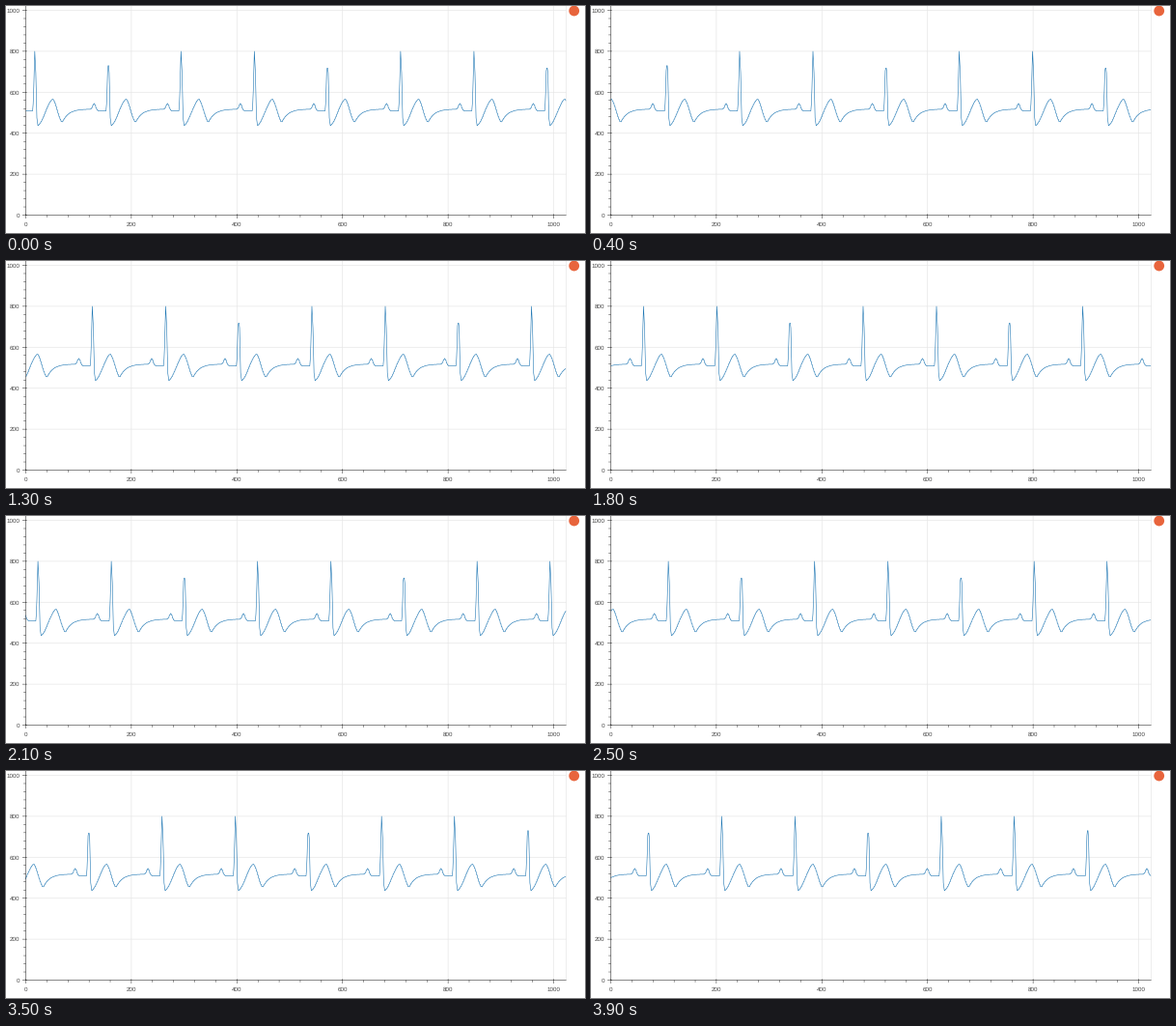
Animation, 600 px wide and 235 px high, one loop 4 s. Source, as a matplotlib script:

```python
import numpy as np
import matplotlib.pyplot as plt
from matplotlib.animation import FuncAnimation
from matplotlib.patches import Circle

plt.rcParams["text.hinting"] = "none"

W, H, DPI = 600, 235, 100
FRAMES, INTERVAL = 40, 100
PT = 72 / DPI  # points per pixel
X0, Y0 = 20.5, 216.5
SX, SY = 0.547, 0.212
SPAN = 1024
PERIOD, FIRST_PEAK = 138.6, 17

# Samples scrolled past at a few moments; the feed rate drifts slightly.
SCROLL_T = [0, 8, 13, 18, 25, 31, 39]
SCROLL_X = [0, 100, 168, 232, 324, 404, 500]


def px(x):
    return X0 + SX * np.asarray(x)


def py(y):
    return Y0 - SY * np.asarray(y)


def ramp(u, u0, u1, y0, y1):
    """Move from y0 to y1, softened at both ends."""
    t = np.clip((u - u0) / (u1 - u0), 0, 1)
    return y0 + (y1 - y0) * (0.3 * t + 0.7 * t * t * (3 - 2 * t))


def rest_wave(u):
    """T wave, recovery and P wave, u samples after the peak."""
    rest = 518 - 65 * np.exp(-(u - 52) / 12)
    p_wave = 27 * np.exp(-((u - 112.5) / 3.5) ** 2)
    tail = ramp(u, 114, 121, 0, -9)
    return np.select([u < 34, u < 52],
                     [ramp(u, 6, 34, 437, 567), ramp(u, 34, 52, 567, 453)],
                     rest + p_wave + tail)


def spike(u, top):
    y = np.interp(u, [-3.5, -2, 0, 2, 4, 6], [509, 610, 800, 695, 475, 437])
    return np.minimum(y, top)


def make_signal(n):
    x = np.arange(n)
    beat = np.floor((x + 4 - FIRST_PEAK) / PERIOD).astype(int)
    u = x - np.round(FIRST_PEAK + PERIOD * beat)
    # Every third beat is caught off its summit.
    top = np.where(beat % 3 == 1,
                   722 + 8 * np.cos(2 * np.pi * (beat // 3) / 3), 800)
    held = u - u % 2 + 0.5
    return np.round(np.where(u <= 6, spike(u, top), rest_wave(held)))


fig = plt.figure(figsize=(W / DPI, H / DPI), dpi=DPI, facecolor="white")
ax = fig.add_axes([0, 0, 1, 1])
ax.set(xlim=(0, W), ylim=(H, 0))
ax.axis("off")


def stroke(xs, ys, color, width):
    return ax.plot(xs, ys, color=color, lw=width * PT, snap=False,
                   solid_capstyle="butt")[0]


def grid(xs, ys):
    stroke(xs, ys, "#e5e5e5", 0.65)


def rule(xs, ys):
    stroke(xs, ys, "black", 0.42)


def label(x, y, value, align):
    ax.text(x, y, str(value), ha=align, va="center_baseline", color="#444444",
            family="Liberation Sans", fontsize=6.3 * PT)


right = px(SPAN)
for v in range(0, 1001, 200):
    gx, gy = px(v), py(v)
    grid([gx, gx], [0, Y0])
    grid([X0, right], [gy, gy])
    label(gx, 226, v, "center")
    label(14.6, gy, v, "right")
grid([right, right], [0, Y0])

trace = stroke([], [], "#1f77b4", 0.58)

rule([X0, X0], [0, Y0])
rule([X0, right], [Y0, Y0])
for v in range(0, 1001, 40):
    out, inner = (3.5, 1.2) if v % 200 == 0 else (2.3, 0)
    gx, gy = px(v), py(v)
    rule([gx, gx], [Y0 - inner, Y0 + out])
    rule([X0 - out, X0 + inner], [gy, gy])

ax.add_patch(Circle((588.7, 5), 5.4, color="#e8643c", lw=0))

signal = make_signal(SPAN + SCROLL_X[-1] + 1)
sample_px = px(np.arange(SPAN))


def update(i):
    start = int(round(np.interp(i, SCROLL_T, SCROLL_X)))
    trace.set_data(sample_px, py(signal[start:start + SPAN]))
    return (trace,)


anim = FuncAnimation(fig, update, frames=FRAMES, interval=INTERVAL,
                     repeat=True, repeat_delay=0, blit=False)
plt.show()
```
